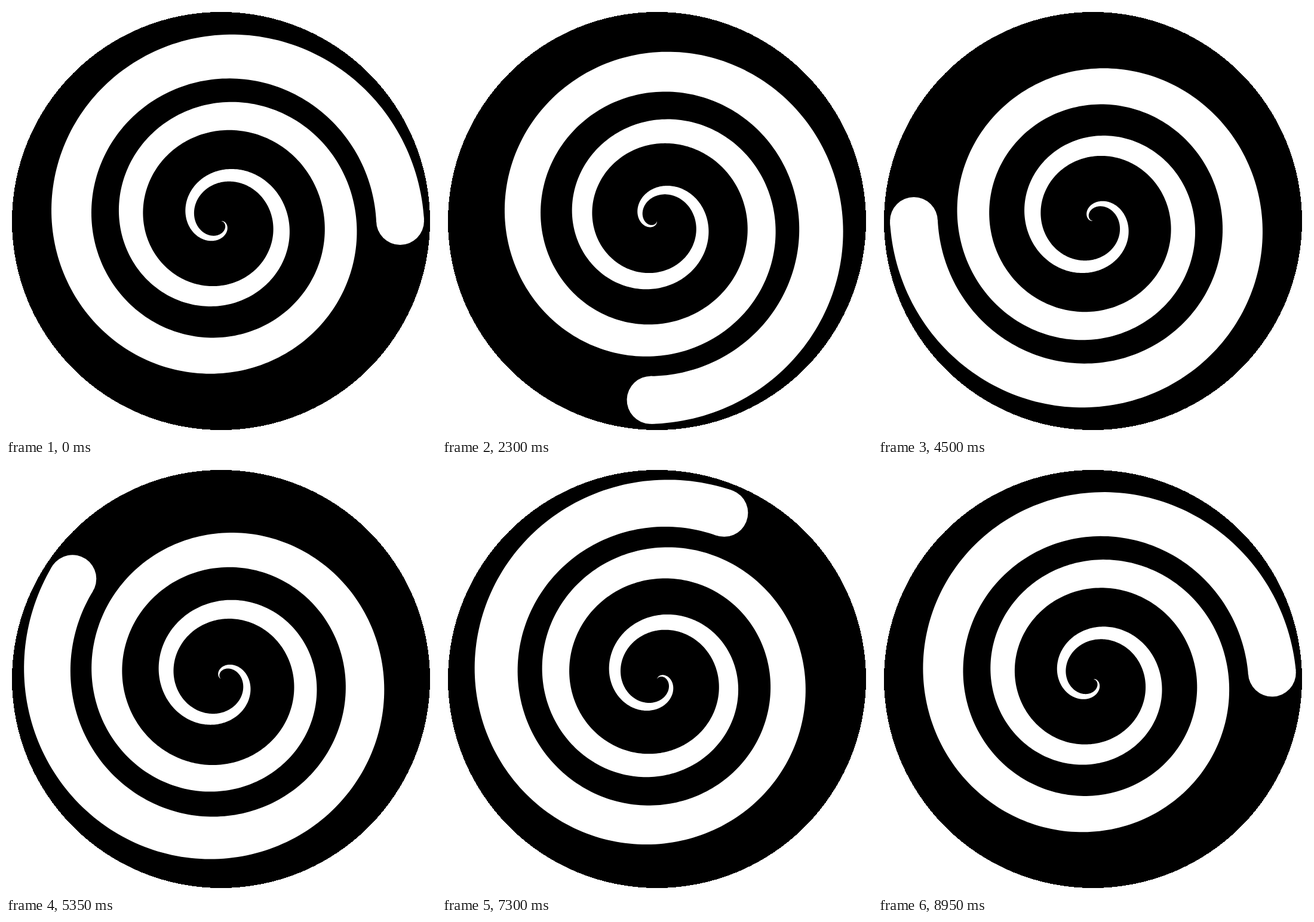
An HTML page for the animation above (9000 ms loop, 720 by 720 pixels).

```html
<!DOCTYPE html>
<html lang="en">
<head>
<meta charset="utf-8">
<title>Spiral</title>
<style>
  html, body { margin: 0; width: 100%; height: 100%; overflow: hidden; background: #fff; }
  svg { display: block; width: 100%; height: 100%; }
</style>
</head>
<body>
<svg viewBox="0 0 720 720">
  <circle cx="360" cy="360" r="350" shape-rendering="crispEdges"/>
  <g id="spiral" fill="#fff">
    <path id="arm"/>
    <circle cx="300" r="40"/>
  </g>
</svg>
<script>
const LOOP = 9000, STEP = 50;
const TURNS = 3, REACH = 300, TIP = 40;
const spiral = document.getElementById('spiral');

// Tapered Archimedean spiral, offset along its normal on both sides
function armPath() {
  const end = TURNS * 2 * Math.PI, pitch = REACH / end, n = 720;
  const outer = [], inner = [];
  for (let i = 0; i <= n; i++) {
    const a = end * i / n, r = pitch * a, half = TIP * i / n;
    const c = Math.cos(a), s = Math.sin(a), len = Math.hypot(r, pitch);
    const nx = (r * c + pitch * s) / len, ny = (r * s - pitch * c) / len;
    const point = k => (r * c + k * nx).toFixed(2) + ' ' + (r * s + k * ny).toFixed(2);
    outer.push(point(half));
    inner.unshift(point(-half));
  }
  return 'M' + outer.concat(inner).join('L') + 'Z';
}

function draw(ms) {
  const step = Math.floor((ms % LOOP + 0.5) / STEP);
  spiral.setAttribute('transform', `translate(360 360) rotate(${step * STEP / LOOP * 360})`);
}

document.getElementById('arm').setAttribute('d', armPath());
draw(0);
let start;
function tick(now) {
  start ??= now;
  draw(now - start);
  requestAnimationFrame(tick);
}
requestAnimationFrame(tick);
</script>
</body>
</html>
```
